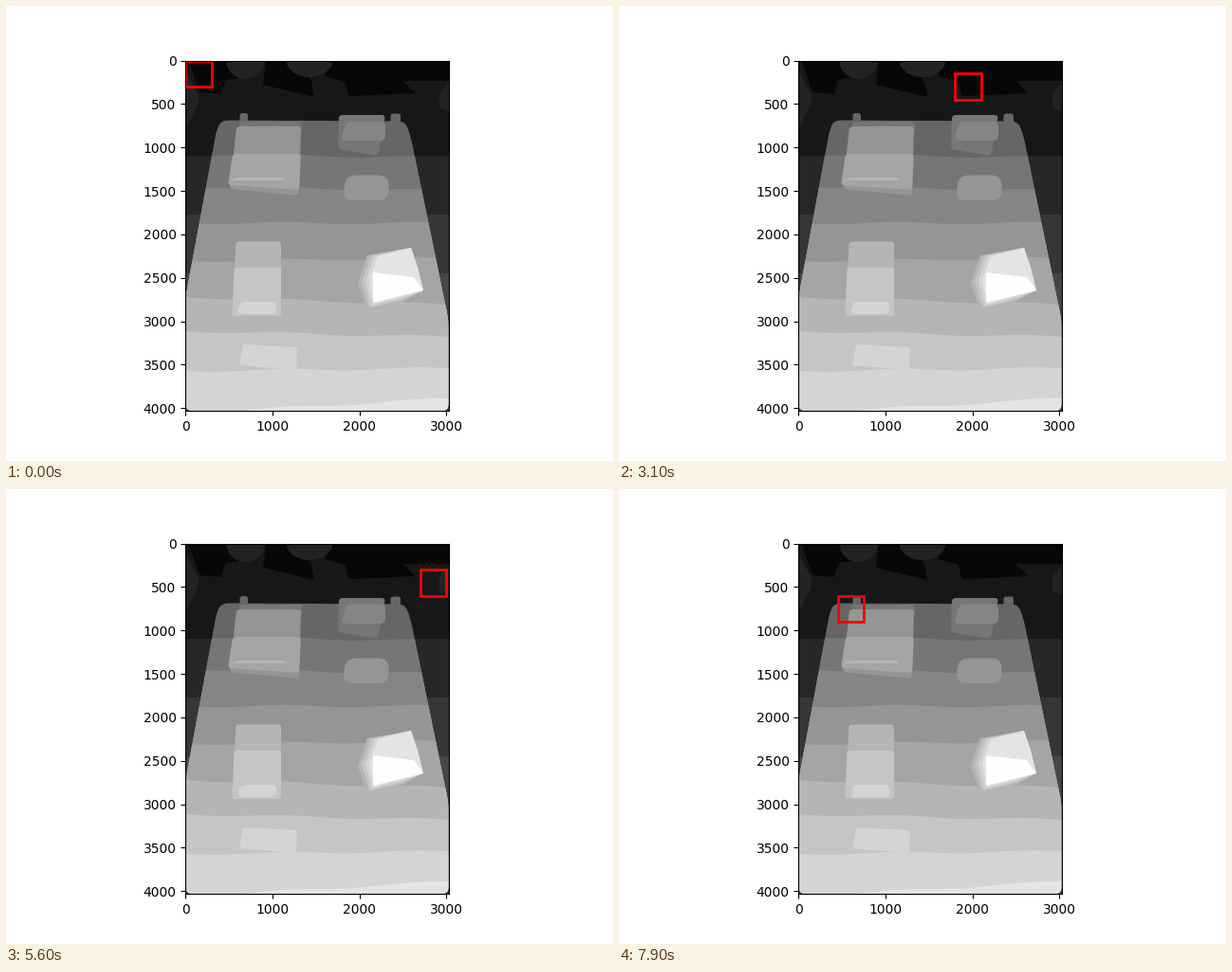
Animation, 640 px wide and 480 px high, one loop 8000 ms. Source, as a matplotlib script:

```python
import numpy as np
import matplotlib.pyplot as plt
from matplotlib.animation import FuncAnimation
from matplotlib.patches import Ellipse, Polygon, Rectangle
from matplotlib.transforms import Affine2D

IMG_W, IMG_H = 3024, 4032
WIN, STRIDE = 300, 150
COLS = (IMG_W - WIN) // STRIDE + 1
FRAMES = 80

# Axes box in stage pixels
LEFT, RIGHT, TOP, BOTTOM = 189.4, 466.6, 57.6, 427.2

fig, ax = plt.subplots(figsize=(6.4, 4.8), dpi=100)
ax.set_aspect("equal")
ax.set_xlim(-0.5, IMG_W - 0.5)
ax.set_ylim(IMG_H - 0.5, -0.5)

stage = Affine2D().scale(1 / 640, -1 / 480).translate(0, 1) + fig.transFigure


def gray(step):
    """Depth is quantised into evenly spaced grays."""
    return str(min(7 + 15.8 * step, 254) / 255)


def add(patch, clip=None):
    patch.set_transform(stage)
    ax.add_patch(patch)
    if clip is not None:
        patch.set_clip_path(clip)
    return patch


def shape(step, points, r=2.0, clip=None):
    """Polygon whose corners are replaced by quadratic curves."""
    p = np.array(points, float)
    t = np.linspace(0, 1, 6)[:, None]
    out = []
    for a, b, c in zip(np.roll(p, 1, 0), p, np.roll(p, -1, 0)):
        da, dc = np.hypot(*(a - b)), np.hypot(*(c - b))
        s = b + (a - b) * min(r / da, 0.5)
        e = b + (c - b) * min(r / dc, 0.5)
        out.append((1 - t) ** 2 * s + 2 * t * (1 - t) * b + t * t * e)
    return add(Polygon(np.vstack(out), fc=gray(step), ec="none"), clip)


def box(step, x0, y0, x1, y1, lean=0, r=3, clip=None):
    """Rounded box whose upper left corner leans inwards."""
    return shape(step, [(x0 + lean, y0), (x1, y0), (x1, y1), (x0, y1)],
                 r, clip)


def band(step, left, right, clip):
    """Fill below a gently waving edge."""
    x = np.linspace(LEFT, RIGHT, 80)
    u = (x - LEFT) / (RIGHT - LEFT)
    y = left + (right - left) * u + 1.2 * np.sin(4 * np.pi * u)
    edge = list(zip(x, y)) + [(RIGHT, BOTTOM), (LEFT, BOTTOM)]
    add(Polygon(edge, fc=gray(step), ec="none"), clip)


def room():
    box(1, LEFT, TOP, RIGHT, BOTTOM, r=0)
    # Steps getting lighter towards the floor
    for i in range(3):
        box(2 + i, LEFT, 158 + 62 * i, RIGHT, BOTTOM, r=0)
    # Near-black patches along the top
    shape(0, [(190, 50), (233, 50), (246, 76), (231, 78), (227, 93),
              (204, 91)])
    shape(0, [(275, 50), (297, 50), (322, 79), (325, 96), (271, 83)])
    shape(0, [(344, 50), (480, 50), (480, 79), (418, 79), (432, 92),
              (361, 95), (358, 80), (336, 74)])
    # Dim shapes at the borders
    add(Ellipse((252.5, 58), 40, 38, fc=gray(1.8)))
    add(Ellipse((320, 57), 49, 36, fc=gray(1.8)))
    shape(1.8, [(185, 58), (203, 95), (202, 105), (185, 138)])
    shape(1.8, [(472, 76), (457, 92), (457, 108), (472, 113)])


def bed():
    # Knobs on the headboard
    box(6, 246.5, 113, 255, 130)
    box(6, 405.5, 113.5, 416, 130)
    base = shape(6, [(LEFT, 307), (222, 131), (227, 120.5), (421, 121.5),
                     (427, 139), (RIGHT, 332), (RIGHT, BOTTOM),
                     (LEFT, BOTTOM)], 8)
    box(7, 246, 122, 312, 135, clip=base)
    edges = [(156, 160), (190, 195), (229, 229), (269, 266),
             (307, 315), (343, 349), (385, 382), (430, 414)]
    for i, (left, right) in enumerate(edges):
        band(7 + i, left, right, base)


def objects():
    # Large box, upper left
    shape(9, [(243, 127), (311, 127), (309, 200), (236, 193)], 4)
    shape(10, [(239, 156), (311, 156), (309, 194), (234, 189)], 4)
    box(11, 236, 181, 294, 184, lean=8, r=1)
    # Small box, upper right
    shape(7, [(351, 115), (400, 115), (392, 158), (350, 151)], 4)
    box(8, 353, 121.5, 400, 142, lean=6, r=6)
    # Rounded lump
    box(9, 355, 178.5, 403.5, 205, lean=3, r=11)
    # Tall box, lower left
    box(11, 238.5, 248.5, 290, 327, lean=4)
    box(12, 238.5, 276, 290, 327, lean=2)
    box(13, 244, 312, 285, 325, lean=3, r=5)
    # Bright box, lower right: the left side fades towards the front
    outer = np.array([(371, 292), (381, 263), (381, 321)])
    inner = np.array([(383, 289), (392, 264), (388, 314)])
    for i in range(4):
        side, top, foot = outer + (inner - outer) * i / 3
        shape(11 + i, [side, top, (427, 255), (434, 276), (440, 300),
                       (418, 312 - 2 * i), foot], 1)
    shape(16, [(387, 281), (430, 286), (440, 300), (387, 313)], 1)
    # Flat patch near the bottom
    shape(13, [(250, 357), (307, 360), (306, 384), (246, 379)], 3)


room()
bed()
objects()
window = Rectangle((0, 0), WIN, WIN, linewidth=2, edgecolor="red",
                   facecolor="none", zorder=2)
ax.add_patch(window)


def update(i):
    row, col = divmod(i, COLS)
    window.set_xy((col * STRIDE, row * STRIDE))
    return (window,)


anim = FuncAnimation(fig, update, frames=FRAMES, interval=100,
                     repeat=True, repeat_delay=0)
plt.show()
```
